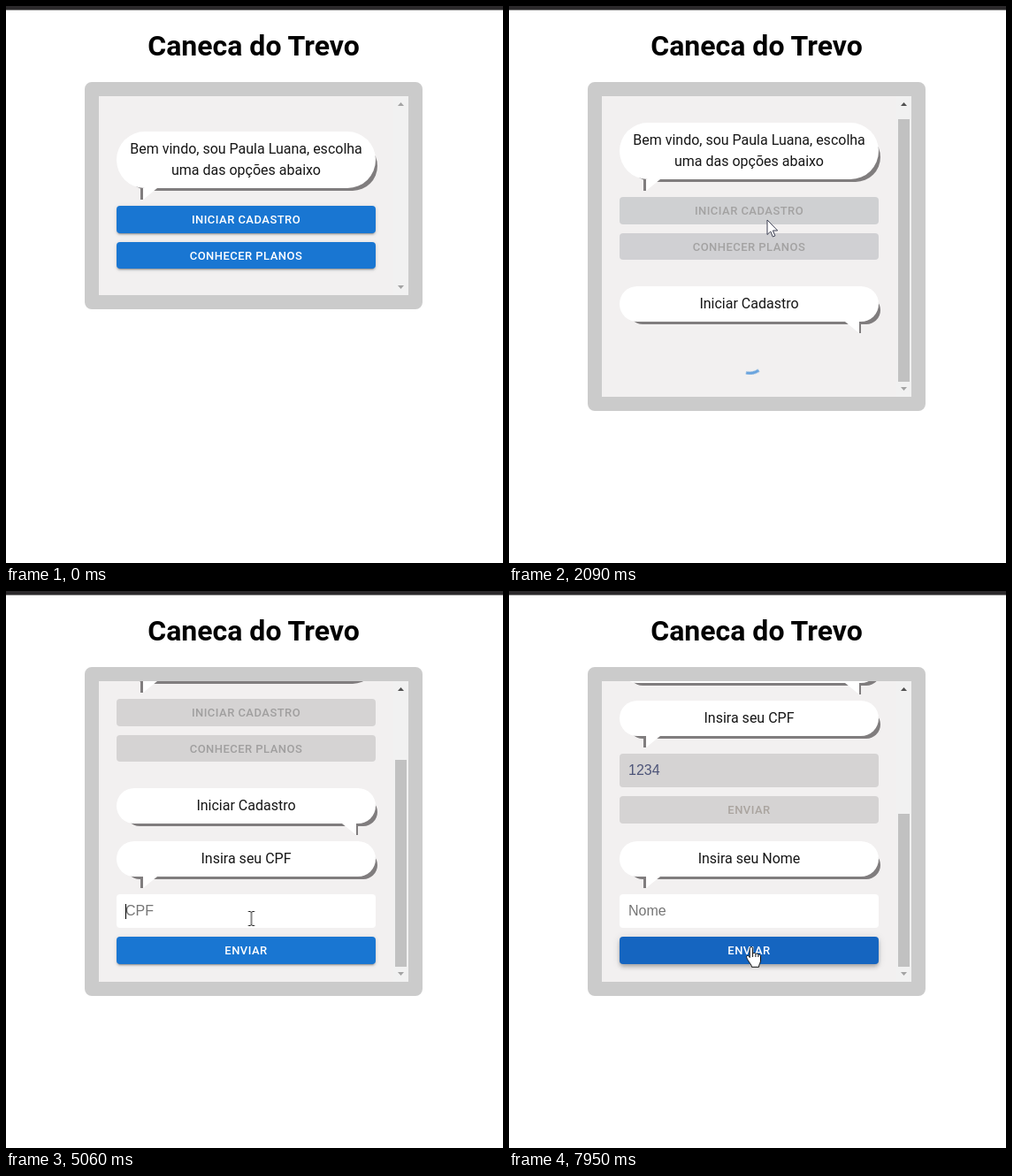
Recreate the animation shown at these times as an HTML page. Size 562 by 630 pixels, loop 8000 ms.

```html
<!DOCTYPE html>
<html lang="pt-BR">
<head>
<meta charset="utf-8">
<title>Chat de cadastro</title>
<style>
  :root {
    --gray: #807d7e;
    --paper: #f2f0f0;
    --off: #d5d3d3;
    --low: 0 3px 1px -2px rgba(0,0,0,.2), 0 2px 2px 0 rgba(0,0,0,.14), 0 1px 5px 0 rgba(0,0,0,.12);
    --mid: 0 2px 4px -1px rgba(0,0,0,.2), 0 4px 5px 0 rgba(0,0,0,.14), 0 1px 10px 0 rgba(0,0,0,.12);
    --high: 0 5px 5px -3px rgba(0,0,0,.2), 0 8px 10px 1px rgba(0,0,0,.14), 0 3px 14px 2px rgba(0,0,0,.12);
    --flat: 0 0 0 0 rgba(0,0,0,0), 0 0 0 0 rgba(0,0,0,0), 0 0 0 0 rgba(0,0,0,0);
  }
  * { box-sizing: border-box; animation-duration: 8s; animation-iteration-count: infinite; animation-timing-function: linear; }
  *::after { animation-duration: 8s; animation-iteration-count: infinite; }
  html, body { margin: 0; width: 100%; height: 100%; overflow: hidden; background: #fff; }
  body { position: relative; font: 16px/24px Roboto, sans-serif; color: #161616; }
  .bar { position: absolute; top: 0; left: 0; width: 100%; height: 5px; background: #2b292b; border-bottom: 1px solid #7f7e7f; }
  h1 { position: absolute; left: 0; top: 25px; width: 560px; margin: 0; font: 700 32px/40px Roboto, sans-serif; text-align: center; color: #000; }

  .panel { position: absolute; left: 89px; top: 86px; width: 382px; height: 257px; border: 16px solid #cbcbcb; border-radius: 8px; background: var(--paper); overflow: hidden; animation-name: grow; animation-timing-function: step-end; }
  .chat { position: absolute; left: 0; top: 0; width: 333px; animation-name: scroll; animation-timing-function: ease-in-out; }
  .bubble, .btn, .field { position: absolute; left: 20px; width: 293px; }

  .bubble { padding: 8px 0; border-radius: 32px; background: #fff; box-shadow: 6px 7px 0 -4px var(--gray); text-align: center; }
  .bubble::before, .bubble::after { content: ""; position: absolute; top: 100%; height: 13px; }
  .bubble::before { left: 27px; width: 3px; background: var(--gray); }
  .bubble::after { left: 30px; width: 16px; background: #fff; clip-path: polygon(0 0, 100% 0, 0 100%); }
  .mine::before { left: 271px; width: 2px; }
  .mine::after { left: 255px; clip-path: polygon(0 0, 100% 0, 100% 100%); }

  .btn { height: 31px; border-radius: 4px; background: #1976d2; color: #fff; box-shadow: var(--low); font: 500 13px/31px Roboto, sans-serif; letter-spacing: .46px; text-align: center; text-transform: uppercase; overflow: hidden; animation-timing-function: ease; }
  .ripple::after { content: ""; position: absolute; left: 0; top: -135px; width: 300px; height: 300px; border-radius: 50%; background: #fff; opacity: 0; animation-name: ripple; animation-delay: var(--click); }

  .field { height: 38px; padding: 0 10px; border-radius: 4px; background: #fff; font: 16px/38px "Liberation Sans", Arial, sans-serif; color: #111; white-space: nowrap; }
  .field i { position: absolute; left: 10px; font-style: normal; color: #757575; }
  .typed { position: relative; float: left; height: 38px; width: 0; animation: type 8s step-end infinite; }
  .typed b { display: block; height: 100%; overflow: hidden; font-weight: 400; }
  .typed::after { content: ""; position: absolute; left: 100%; top: 11px; width: 1px; height: 17px; background: #000; visibility: hidden; animation-name: blink; animation-timing-function: step-end; }

  .step2, .step3, .step4, .loader, .cpf { animation-timing-function: step-end; }
  .step2 { animation-name: show2; }
  .step3 { animation-name: show3; }
  .step4 { animation-name: show4; }
  .loader { position: absolute; left: 146.5px; top: 285px; animation-name: wait; }
  .loader g { animation-name: spin; }
  .loader circle { animation-name: dash; animation-timing-function: ease-in-out; }
  .cpf { animation-name: placeholder; }

  .rail { position: absolute; right: 0; top: 0; width: 17px; height: 100%; background: #f1f1f1; }
  .thumb { position: absolute; left: 2px; width: 13px; background: #c1c1c1; animation-name: thumb; animation-timing-function: ease-in-out; }
  .up, .down { position: absolute; left: 5px; width: 7px; height: 4px; background: #a3a3a3; }
  .up { top: 7px; clip-path: polygon(50% 0, 100% 100%, 0 100%); animation-name: wake; animation-timing-function: step-end; }
  .down { bottom: 7px; clip-path: polygon(0 0, 100% 0, 50% 100%); }

  .cursor { position: absolute; left: 0; top: 0; width: 1px; height: 1px; overflow: visible; animation-name: move; }
  .cursor g { visibility: hidden; animation-timing-function: step-end; }
  .arrow { animation-name: arrow; }
  .beam { animation-name: beam; }
  .hand { animation-name: hand; }

  @keyframes grow { 0% { height: 257px } 23.75%, 100% { height: 372px } }
  @keyframes scroll {
    0%, 23.75% { transform: translateY(0) }
    26%, 31.1% { transform: translateY(-10px) }
    36.4%, 88.5% { transform: translateY(-104px) }
    91.8%, 100% { transform: translateY(-263px) }
  }
  @keyframes thumb {
    0%, 23.74% { top: 17px; height: 0 }
    23.75% { top: 17px; height: 297px }
    26%, 31.09% { top: 26px; height: 297px }
    31.1% { top: 24px; height: 234px }
    36.4%, 88.49% { top: 89px; height: 234px }
    88.5% { top: 70px; height: 173px }
    91.8%, 100% { top: 150px; height: 173px }
  }
  @keyframes wake { 0% { background: #a3a3a3 } 23.75%, 100% { background: #505050 } }

  @keyframes show2 { 0% { visibility: hidden } 23.75%, 100% { visibility: visible } }
  @keyframes show3 { 0% { visibility: hidden } 31.1%, 100% { visibility: visible } }
  @keyframes show4 { 0% { visibility: hidden } 88.5%, 100% { visibility: visible } }
  @keyframes wait { 0% { visibility: hidden } 23.75% { visibility: visible } 31.1%, 100% { visibility: hidden } }
  @keyframes spin { 0%, 23.75% { transform: rotate(0); opacity: .3 } 28.75% { opacity: 1 } 32.5%, 100% { transform: rotate(180deg); opacity: 1 } }
  @keyframes dash {
    0%, 23.75% { stroke-dasharray: 1px 200px; stroke-dashoffset: 0 }
    32.5%, 100% { stroke-dasharray: 100px 200px; stroke-dashoffset: -15px }
  }

  @keyframes start {
    0%, 11.7% { background: #1976d2; color: #fff; box-shadow: var(--low) }
    14.5%, 20.5% { background: #1565c0; color: #fff; box-shadow: var(--mid) }
    23.75% { background: #1565c0; color: #fff; box-shadow: var(--high) }
    26.8%, 100% { background: var(--off); color: #a09f9f; box-shadow: var(--flat) }
  }
  @keyframes plans {
    0%, 23.75% { background: #1976d2; color: #fff; box-shadow: var(--low) }
    26.8%, 100% { background: var(--off); color: #a09f9f; box-shadow: var(--flat) }
  }
  @keyframes send {
    0%, 87.2% { background: #1976d2; color: #fff; box-shadow: var(--low) }
    89.5% { background: #1565c0; color: #fff; box-shadow: var(--mid) }
    91%, 92.4% { background: #1565c0; color: #fff; box-shadow: var(--high) }
    95.2%, 100% { background: var(--off); color: #aaa49f; box-shadow: var(--flat) }
  }
  @keyframes next {
    0%, 92.2% { background: #1976d2; box-shadow: var(--low) }
    95.2%, 100% { background: #1565c0; box-shadow: var(--mid) }
  }
  @keyframes ripple { 0% { transform: scale(0); opacity: .25 } 2% { opacity: .25 } 3.2% { transform: scale(1.2); opacity: 0 } 100% { opacity: 0 } }

  @keyframes type { 0% { width: 0 } 77.5% { width: 1ch } 78.75% { width: 2ch } 80.5% { width: 3ch } 83%, 100% { width: 4ch } }
  @keyframes blink {
    0%, 56.625%, 69.875%, 88%, 100% { visibility: hidden }
    50%, 63.25%, 76.375% { visibility: visible }
  }
  @keyframes placeholder { 0% { opacity: 1 } 77.5%, 100% { opacity: 0 } }
  @keyframes lock { 0% { background: #fff; color: #111 } 88.5%, 100% { background: var(--off); color: #4d5478 } }

  @keyframes move {
    0%, 4.75% { transform: translate(485px, 502px) }
    6.5% { transform: translate(445px, 430px) }
    8.5% { transform: translate(385px, 300px) }
    10% { transform: translate(325px, 205px) }
    10.9% { transform: translate(305px, 184px) }
    12% { transform: translate(298px, 228px) }
    13.5% { transform: translate(293px, 240px) }
    14.6%, 31.1% { transform: translate(292px, 242px) }
    33% { transform: translate(300px, 243px) }
    36.5%, 41.8% { transform: translate(316.5px, 240px) }
    42.6%, 44.3% { transform: translate(313.5px, 238px) }
    46% { transform: translate(316px, 290px) }
    48.5% { transform: translate(296px, 372px) }
    49.4% { transform: translate(284px, 380px) }
    50.8%, 60% { transform: translate(276.5px, 374px) }
    60.75%, 86.2% { transform: translate(277.5px, 370px) }
    87.5% { transform: translate(278px, 396px) }
    88.5%, 97.7% { transform: translate(278px, 403px) }
    99.3%, 100% { transform: translate(274px, 402px) }
  }
  @keyframes arrow {
    0%, 10.2%, 11.9%, 35%, 49.6%, 100% { visibility: hidden }
    4.75%, 11.3%, 23.75%, 44.4% { visibility: visible }
  }
  @keyframes beam {
    0%, 11.3%, 44.4%, 87.1%, 100% { visibility: hidden }
    10.2%, 35%, 49.6% { visibility: visible }
  }
  @keyframes hand {
    0%, 23.75% { visibility: hidden }
    11.9%, 87.1%, 100% { visibility: visible }
  }
</style>
</head>
<body>
<div class="bar"></div>
<h1>Caneca do Trevo</h1>

<div class="panel">
  <div class="chat">
    <div class="bubble" style="top:40px">Bem vindo, sou Paula Luana, escolha<br>uma das opções abaixo</div>
    <div class="btn ripple" style="top:124px; animation-name:start; --click:1.64s">Iniciar Cadastro</div>
    <div class="btn" style="top:165px; height:30px; animation-name:plans">Conhecer Planos</div>

    <div class="step2">
      <div class="bubble mine" style="top:225px">Iniciar Cadastro</div>
    </div>
    <svg class="loader" width="40" height="40" viewBox="-22 -22 44 44">
      <g><circle r="20.2" fill="none" stroke="#1976d2" stroke-width="3.6"/></g>
    </svg>

    <div class="step3">
      <div class="bubble" style="top:285px">Insira seu CPF</div>
      <div class="field" style="top:345px; animation-name:lock; animation-timing-function:step-end">
        <i class="cpf">CPF</i><span class="typed"><b>1234</b></span>
      </div>
      <div class="btn ripple" style="top:393px; animation-name:send; --click:7.08s">Enviar</div>
    </div>

    <div class="step4">
      <div class="bubble" style="top:444px">Insira seu Nome</div>
      <div class="field" style="top:504px"><i>Nome</i></div>
      <div class="btn" style="top:552px; animation-name:next">Enviar</div>
    </div>
  </div>

  <div class="rail">
    <div class="up"></div>
    <div class="thumb"></div>
    <div class="down"></div>
  </div>
</div>

<svg class="cursor">
  <g class="arrow"><path d="M0 0V16.5L3.8 13 6.3 19 8.9 17.9 6.4 12H11.7Z" fill="#fff" stroke="#3c3f52"/></g>
  <g class="beam"><path d="M-3.5-7.5H-1L0-6.5 1-7.5H3.5M0-7V8M-3.5 8.5H-1L0 7.5 1 8.5H3.5" fill="none" stroke="#111"/></g>
  <g class="hand" stroke="#111">
    <path d="M-1.8 2.3a1.7 1.7 0 0 1 3.4 0V8c.5-.8 3-.8 3.3.6.7-.8 2.8-.5 3 .8 1-.6 2.6 0 2.6 1.5V16c0 3-2 4-2 7.3H.5c0-2.3-2.5-4.3-4.3-7.8-.9-1.6-1.6-3-1.6-3.6 0-1.8 2-2 2.8-.6l.8 1.3z" fill="#fff"/>
    <path d="M1.6 8v4M4.9 8.6V12M7.9 9.4V12" fill="none"/>
  </g>
</svg>
</body>
</html>
```
